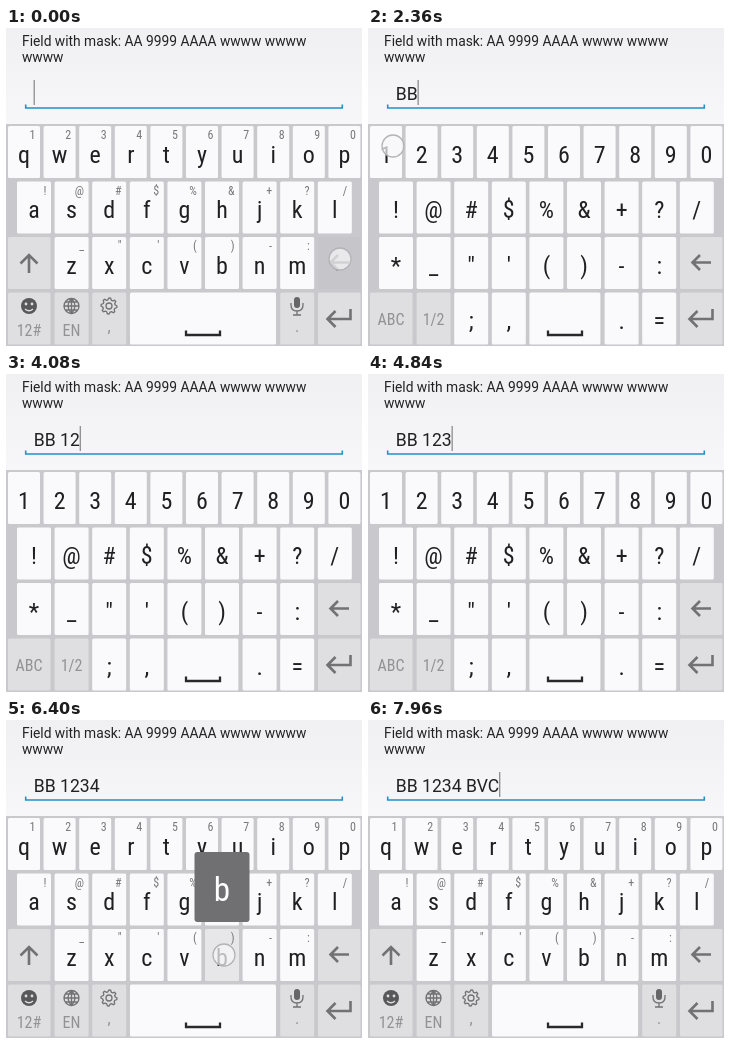
Write an HTML page that moves like this. It is 356 px wide and 318 px high and loops after 8000 ms.

```html
<!DOCTYPE html>
<html lang="en">
<head>
<meta charset="utf-8">
<title>Masked field</title>
<style>
  html, body { margin: 0; width: 100%; height: 100%; overflow: hidden; background: #f3f2f5; }
  svg { display: block; width: 356px; height: 318px; }
  text { font-family: "Roboto Condensed", Roboto, sans-serif; font-stretch: 75%; white-space: pre; }
  .wide { font-family: Roboto, sans-serif; font-stretch: normal; fill: #222; }
  .label { font-size: 24px; text-anchor: middle; fill: #202022; }
  .hint { font-size: 12px; text-anchor: end; fill: #77777a; }
  .small { font-size: 16px; text-anchor: middle; fill: #929294; }
  .key { fill: #faf9fc; }
  .key.fn { fill: #dfdee1; }
  .key.down { fill: #e7e6e9; }
  .key.fn.down { fill: #c6c5c9; }
  .icon { fill: none; stroke: #727274; stroke-width: 2.6; }
  .thin { stroke-width: 1.3; }
</style>
</head>
<body>
<svg id="stage" viewBox="0 0 356 318">
  <defs>
    <linearGradient id="paper" x2="0" y2="1">
      <stop stop-color="#f0eff2"/><stop offset="1" stop-color="#f7f6f9"/>
    </linearGradient>
  </defs>
  <rect width="356" height="96" fill="url(#paper)"/>
  <g class="wide" font-size="13.8">
    <text class="wide" x="16" y="18">Field with mask: AA 9999 AAAA wwww wwww</text>
    <text class="wide" x="16" y="34">wwww</text>
  </g>
  <text id="field" class="wide" x="27.8" y="72" font-size="17.6"></text>
  <rect id="cursor" y="52" width="1.2" height="25" fill="#858588"/>
  <path d="M19.7 76.5V80H336.3V76.5" fill="none" stroke="#2291c5" stroke-width="1.6"/>
  <rect y="96" width="356" height="222" fill="#c9c8cc"/>
  <g id="boards"></g>
  <g id="popup">
    <rect width="55" height="70" rx="3" fill="#707072"/>
    <text id="popupLabel" x="27.5" y="49" font-size="33" text-anchor="middle" fill="#fff"></text>
  </g>
  <circle id="touch" r="11" fill="#f7f7fa" fill-opacity=".72" stroke="#b4b4b8" stroke-width="1.3"/>
</svg>
<script>
const $ = id => document.getElementById(id);
const LOOP = 8000, ROWS = [98, 153.5, 209, 264.5], KEY_H = 52;
const PITCH = 37.6, KEY_W = 34;

function add(parent, tag, attrs, content = '') {
  const el = document.createElementNS('http://www.w3.org/2000/svg', tag);
  for (const name in attrs) el.setAttribute(name, attrs[name]);
  el.textContent = content;
  parent.append(el);
  return el;
}

function makeBoard() {
  const group = add($('boards'), 'g', {});
  const keys = {};
  const key = (name, x, row, w = KEY_W, fn = false) => {
    const y = ROWS[row];
    const rect = add(group, 'rect', { class: fn ? 'key fn' : 'key', x, y, width: w, height: KEY_H, rx: 1.5 });
    keys[name] = { rect, fn, cx: x + w / 2, y };
  };
  const text = (cls, x, y, s) => add(group, 'text', { class: cls, x, y }, s);
  const icon = (d, cls = '') => add(group, 'path', { class: 'icon ' + cls, d });
  const label = (s, x, row, w = KEY_W) => {
    key(s, x, row, w);
    text('label', x + w / 2, ROWS[row] + 36.7, s);
  };
  const line = (chars, hints, x, row, pitch = PITCH, w = KEY_W) =>
    [...chars].forEach((c, i) => {
      label(c, x + i * pitch, row, w);
      if (hints) text('hint', x + i * pitch + w - 4.5, ROWS[row] + 13, hints[i]);
    });
  const common = (spaceX, spaceW) => {
    key('back', 312, 2, 42.5, true);
    icon('M343 234.5H325M332 227L324.5 234.5L332 242');
    key('enter', 312, 3, 42.5, true);
    icon('M344.5 281V291H322M329.5 283L321.5 291L329.5 299');
    key('space', spaceX, 3, spaceW);
    add(group, 'path', { d: 'M180 302.5V307H214V302.5', fill: 'none', stroke: '#29292b', 'stroke-width': 2.3 });
  };
  return { group, keys, key, text, icon, label, line, common };
}

function makeLetters() {
  const b = makeBoard();
  b.line('qwertyuiop', '1234567890', 2, 0, 35.6, 32);
  b.line('asdfghjkl', '!@#$%&+?/', 11, 1);
  b.line('zxcvbnm', '_"\'()-:', 48.6, 2);
  b.key('shift', 2, 2, 42.5, true);
  b.icon('M23 245V227M14.5 235.5L23 227L31.5 235.5');
  b.common(124, 146);
  b.key('12#', 2, 3, 42.5, true);
  b.key('lang', 48.6, 3, KEY_W, true);
  b.key('gear', 86.2, 3, KEY_W, true);
  b.key('mic', 274.2, 3, KEY_W, true);
  b.text('small', 23, 308, '12#');
  b.text('small', 65.5, 308, 'EN');
  b.text('small', 103, 304, ',');
  b.text('small', 291, 304, '.');
  add(b.group, 'circle', { cx: 23, cy: 278, r: 8, fill: '#58585a' });
  for (const cx of [20, 26]) add(b.group, 'circle', { cx, cy: 276, r: 1.4, fill: '#dfdee1' });
  add(b.group, 'path', { d: 'M19 281Q23 284.5 27 281', fill: 'none', stroke: '#dfdee1', 'stroke-width': 1.3 });
  b.icon('M58 278a7.5 7.5 0 1 0 15 0a7.5 7.5 0 1 0-15 0H73M65.5 270.5V285.5M59.5 274H71.5M59.5 282H71.5' +
    'M65.5 270.5q-7 7.5 0 15q7-7.5 0-15', 'thin');
  let gear = '';
  for (let i = 0; i < 32; i++) {
    const r = i % 4 < 2 ? 8 : 6.2, a = i * Math.PI / 16;
    gear += (i ? 'L' : 'M') + (103 + r * Math.cos(a)).toFixed(1) + ' ' + (278 + r * Math.sin(a)).toFixed(1);
  }
  b.icon(gear + 'ZM100 278a3 3 0 1 0 6 0a3 3 0 1 0-6 0', 'thin');
  add(b.group, 'rect', { x: 288, y: 269, width: 6, height: 11, rx: 3, fill: '#666668' });
  b.icon('M285 275v2q0 6 6 6t6-6v-2M291 283v4M287 287h8', 'thin');
  return b;
}

function makeSymbols() {
  const b = makeBoard();
  b.line('1234567890', '', 2, 0, 35.6, 32);
  b.line('!@#$%&+?/', '', 11, 1);
  b.line('*_"\'()-:', '', 11, 2);
  b.common(161.4, 71);
  b.key('ABC', 2, 3, 42.5, true);
  b.key('1/2', 48.6, 3, KEY_W, true);
  b.text('small', 23, 297, 'ABC');
  b.text('small', 65.5, 297, '1/2');
  b.line(';,', '', 86.2, 3);
  b.line('.=', '', 236.6, 3);
  return b;
}

const letters = makeLetters(), symbols = makeSymbols();

// Finger lands at start, key reacts after DELAY, input happens at up.
const DELAY = 160, LINGER = 80;
const press = (name, start, up, x, y, typed = '') => ({ name, start, up, x, y, typed });
const presses = [
  press('back', -400, 200, 334, 231),
  press('b', 720, 1080, 218, 235, 'B'),
  press('b', 1480, 1880, 218, 235, 'B'),
  press('12#', 1960, 2240, 23, 300),
  press('1', 2300, 2760, 25, 118, '1'),
  press('2', 3280, 3700, 57, 120, ' 2'.trim()),
  press('3', 4220, 4640, 92, 120, '3'),
  press('4', 5100, 5520, 127, 120, '4'),
  press('ABC', 5720, 6000, 25, 302),
  press('b', 6220, 6620, 218, 235, 'B'),
  press('v', 6860, 7280, 181, 235, 'V'),
  press('c', 7560, 7880, 143, 236, 'C')
];
const mask = s => [s.slice(0, 2), s.slice(2, 6), s.slice(6)].filter(Boolean).join(' ');
const clamp = v => Math.max(0, Math.min(1, v));
const show = (el, on) => { el.style.display = on ? '' : 'none'; };

function draw(t) {
  const inSymbols = t >= 2240 && t < 6000;
  const board = inSymbols ? symbols : letters;
  show(letters.group, !inSymbols);
  show(symbols.group, inSymbols);

  const done = presses.filter(p => p.typed && p.up <= t);
  const lastTyped = done.length ? done[done.length - 1].up : 0;
  $('field').textContent = mask(done.map(p => p.typed).join(''));
  const width = done.length ? $('field').getComputedTextLength() : 0;
  $('cursor').setAttribute('x', 27.6 + width);
  show($('cursor'), (t - lastTyped) % 1000 < 500);

  for (const k of Object.values(board.keys)) k.rect.classList.remove('down');
  show($('popup'), false);
  let opacity = 0;
  for (const p of presses) {
    const k = board.keys[p.name];
    if (!k || t < p.start || t >= p.up + LINGER) continue;
    const active = t >= p.start + DELAY;
    k.rect.classList.toggle('down', active);
    if (t >= p.up) continue;
    opacity = Math.min(clamp((t - p.start) / 60), clamp((p.up - t) / 80));
    $('touch').setAttribute('cx', p.x);
    $('touch').setAttribute('cy', p.y);
    if (active && !k.fn) {
      show($('popup'), true);
      $('popup').setAttribute('transform', `translate(${k.cx - 27.5} ${k.y - 77})`);
      $('popupLabel').textContent = p.name;
    }
  }
  $('touch').setAttribute('opacity', opacity);
}

const began = performance.now();
function tick() {
  draw((performance.now() - began) % LOOP);
  requestAnimationFrame(tick);
}
tick();
</script>
</body>
</html>
```
